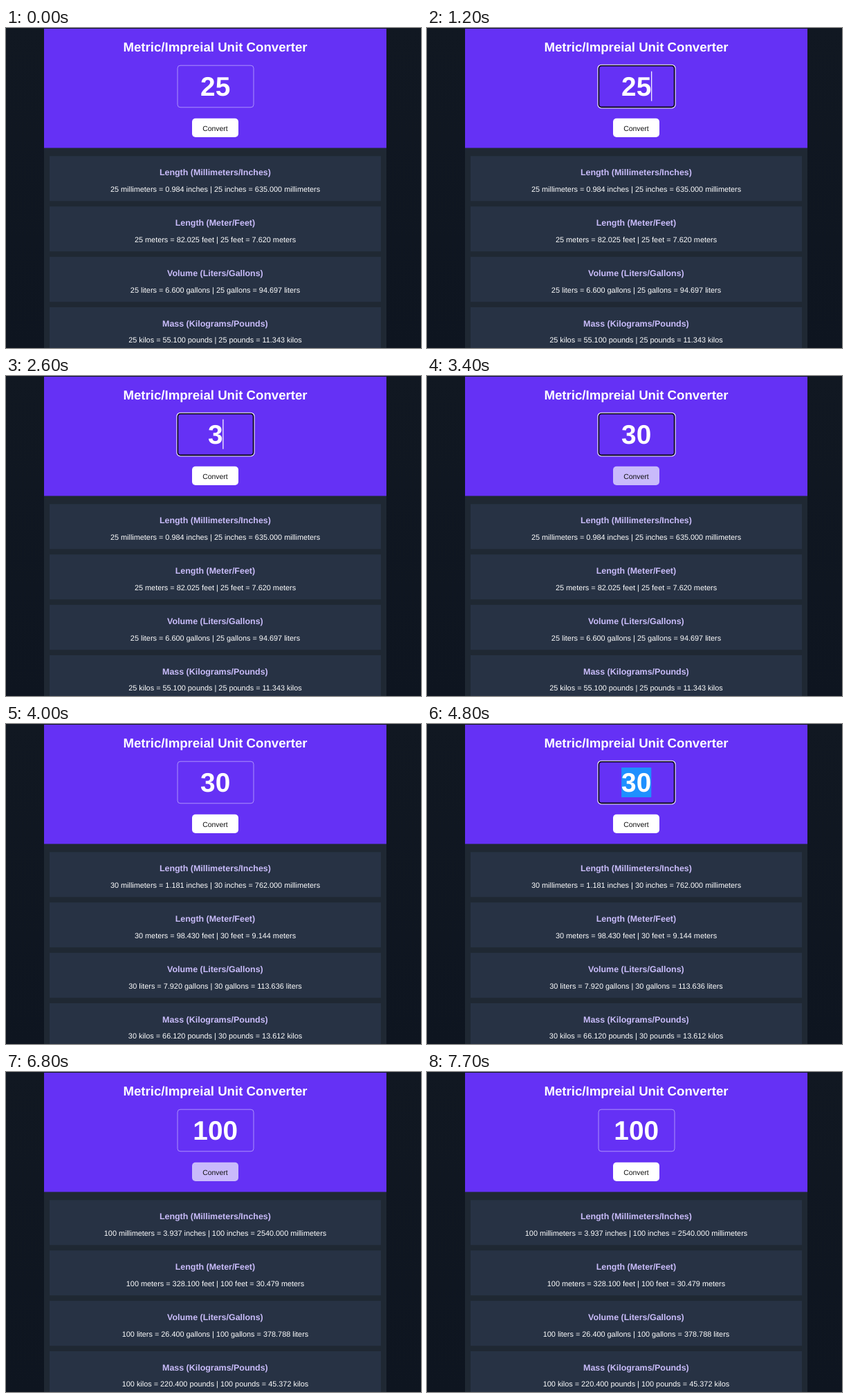
Animation of 600 by 463 pixels, one loop 8 s. Source, as an HTML page:

```html
<!DOCTYPE html>
<html lang="en">
<head>
<meta charset="utf-8">
<title>Unit converter</title>
<style>
  html, body { margin: 0; width: 100%; height: 100%; overflow: hidden; background: #0f1621; }
  svg { display: block; width: 600px; height: 463px; }
  text { font-family: "Liberation Sans", Arial, sans-serif; text-anchor: middle; text-rendering: geometricPrecision; fill: #fff; }
  .title { font-size: 18.65px; font-weight: bold; }
  .number { font-size: 38.8px; font-weight: bold; }
  .button { font-size: 10.4px; fill: #111; }
  .head { font-size: 12.44px; font-weight: bold; fill: #c9bcfa; }
  .line { font-size: 10.89px; }
</style>
</head>
<body>
<svg viewBox="0 0 600 463">
  <defs>
    <linearGradient id="page" x2="0" y2="1">
      <stop stop-color="#111822"/>
      <stop offset="1" stop-color="#0e1520"/>
    </linearGradient>
  </defs>
  <rect width="600" height="463" fill="url(#page)"/>
  <rect x="55" y="1" width="495" height="462" fill="#1f2833"/>
  <rect x="55" y="1" width="495" height="172.5" fill="#6531f5"/>
  <text class="title" x="302.5" y="34">Metric/Impreial Unit Converter</text>
  <rect id="border" x="248" y="54.2" width="110" height="60.6" rx="4" fill="none" stroke="#ad92fa"/>
  <g id="ring" fill="none">
    <rect x="247" y="53.3" width="112" height="62.6" rx="5" stroke="#fff" stroke-width="1.2"/>
    <rect x="248.4" y="54.7" width="109.2" height="59.8" rx="4" stroke="#100c20" stroke-width="1.8"/>
  </g>
  <rect id="selection" y="63" height="43" fill="#1e90ff"/>
  <text id="number" class="number" x="302.7" y="98.4"></text>
  <rect id="caret" y="62.7" width="1.2" height="43" fill="#fff"/>
  <rect id="button" x="269" y="130.8" width="67" height="27.2" rx="5"/>
  <text class="button" x="302.4" y="148.7">Convert</text>
  <g id="cards"></g>
</svg>
<script>
const $ = id => document.getElementById(id);
const LOOP = 8000, DIGIT = 38.8 * 0.556;

// title, metric unit, imperial unit, imperial per metric
const units = [
  ["Length (Millimeters/Inches)", "millimeters", "inches", 1 / 25.4],
  ["Length (Meter/Feet)", "meters", "feet", 3.281],
  ["Volume (Liters/Gallons)", "liters", "gallons", 0.264],
  ["Mass (Kilograms/Pounds)", "kilos", "pounds", 2.204]
];

$("cards").innerHTML = units.map(([title], i) => `
  <g transform="translate(0 ${i * 72.9})">
    <rect x="63" y="185.3" width="479" height="65" fill="#273244"/>
    <text class="head" x="302.4" y="212.9">${title}</text>
    <text class="line" x="302.5" y="236.8"></text>
  </g>`).join("");
const lines = document.querySelectorAll(".line");

// Each event changes part of the state from its time on.
const events = [
  [0, { value: "25", result: 25, focus: false, caret: false, selected: 0, hover: false }],
  [1200, { focus: true, caret: true }],
  [1500, { caret: false, selected: 1 }],
  [1700, { selected: 2 }],
  [2600, { value: "3", selected: 0, caret: true }],
  [2800, { value: "30" }],
  [3300, { caret: false }],
  [3400, { hover: true }],
  [3600, { focus: false }],
  [3700, { result: 30 }],
  [4000, { hover: false }],
  [4500, { focus: true, caret: true }],
  [4600, { caret: false, selected: 1 }],
  [4800, { selected: 2 }],
  [5400, { value: "1", selected: 0, caret: true }],
  [5600, { value: "10" }],
  [5800, { value: "100" }],
  [6300, { caret: false }],
  [6500, { hover: true }],
  [6700, { focus: false }],
  [6800, { result: 100 }],
  [7700, { hover: false }]
];

const show = (id, on) => $(id).setAttribute("visibility", on ? "visible" : "hidden");

function draw(t) {
  const s = Object.assign({}, ...events.filter(e => e[0] <= t).map(e => e[1]));
  const right = 302.7 + s.value.length * DIGIT / 2;
  $("number").textContent = s.value;
  show("border", !s.focus);
  show("ring", s.focus);
  show("caret", s.focus && s.caret);
  $("caret").setAttribute("x", right - 0.2);
  $("selection").setAttribute("x", right - s.selected * DIGIT);
  $("selection").setAttribute("width", s.selected * DIGIT);
  $("button").setAttribute("fill", s.hover ? "#c9bafb" : "#fff");
  units.forEach(([, metric, imperial, rate], i) => {
    const n = s.result;
    lines[i].textContent = `${n} ${metric} = ${(n * rate).toFixed(3)} ${imperial} | ` +
      `${n} ${imperial} = ${(n / rate).toFixed(3)} ${metric}`;
  });
}

const start = performance.now();
function tick() {
  draw((performance.now() - start) % LOOP);
  requestAnimationFrame(tick);
}
tick();
</script>
</body>
</html>
```
